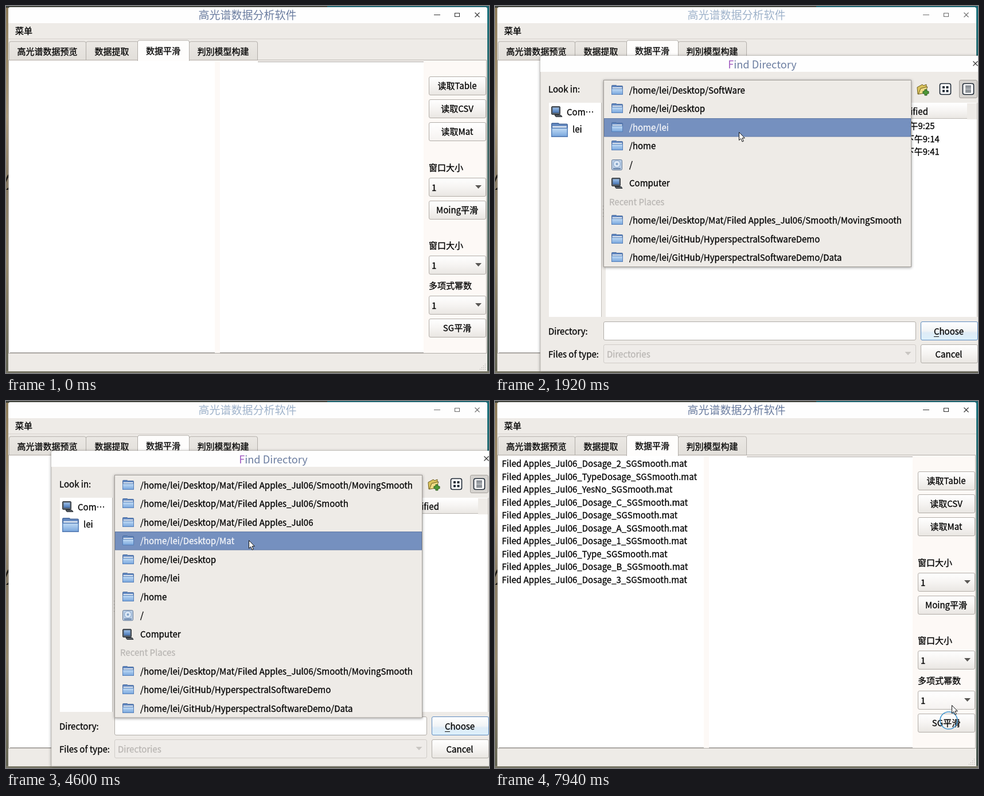
An HTML page that plays this animation: 842x641 px, repeating every 7.99 s.

```html
<!DOCTYPE html>
<html lang="zh-CN">
<head>
<meta charset="utf-8">
<title>数据平滑</title>
<style>
html, body { margin: 0; width: 100%; height: 100%; overflow: hidden; }
svg { display: block; width: 842px; height: 641px; }
text {
  font: 15px 'Noto Sans CJK SC', 'Noto Sans CJK', 'Noto Sans', sans-serif;
  color: #000; fill: currentColor; stroke: currentColor; stroke-width: .3px;
}
.title { font-size: 19px; stroke: none; color: #6b7da0; }
.title.small { font-size: 18.2px; }
.off { color: #b9b6b3; }
</style>
</head>
<body>
<svg id="stage" viewBox="0 0 842 641"></svg>
<script>
const LOOP = 7990, USER = '/home/lei', ROW = 32.5, POPUP_TOP = 131;
const PANEL = '#eeebe7', EDGE = '#b1ada8', BLUE = '#7590bf';

// --- drawing helpers; text is placed by its vertical centre
const text = (x, mid, s, attrs = '') =>
  `<text x="${x}" y="${Math.floor(mid + 6)}" ${attrs}>${s}</text>`;
const centred = (x, mid, s, attrs = '') => text(x, mid, s, 'text-anchor="middle" ' + attrs);
const rect = (x, y, w, h, fill, attrs = '') =>
  `<rect x="${x}" y="${y}" width="${w}" height="${h}" fill="${fill}" ${attrs}/>`;
const line = (d, stroke = EDGE, width = 1) =>
  `<path d="${d}" fill="none" stroke="${stroke}" stroke-width="${width}"/>`;
const group = (id, body, attrs = '') => `<g id="${id}" ${attrs}>${body}</g>`;
const at = (x, y, body) => `<g transform="translate(${x} ${y})">${body}</g>`;
const box = (x, y, w, h, fill = 'url(#face)', stroke = EDGE, attrs = '') =>
  rect(x + .5, y + .5, w - 1, h - 1, fill, `rx="2.5" stroke="${stroke}" ${attrs}`);
const arrow = (x, y, fill = '#5a5855') => `<path d="M${x - 5.5} ${y - 3}h11l-5.5 6z" fill="${fill}"/>`;
const control = y => box(737, y, 100, 33, 'url(#face)', EDGE, `class="control" data-y="${y}"`);
const button = (y, s) => control(y) + centred(786.5, y + 16, s);
const combo = y => control(y) + text(742, y + 17, '1') + arrow(823.5, y + 16);
const gradient = (id, stops) => `<linearGradient id="${id}" x2="0" y2="1">` +
  stops.map(([o, c]) => `<stop offset="${o}" stop-color="${c}"/>`).join('') + '</linearGradient>';
const grip = (x, y) => [0, 1, 2, 3].map(i => [...Array(i + 1).keys()].map(j =>
  rect(x - j * 3, y - (3 - i) * 3, 1, 1, '#a8a4a0')).join('')).join('');

// --- icons
const folder = (x, y, scale = 1) => `<g transform="translate(${x} ${y}) scale(${scale})">` +
  '<path d="M.5 16.500V1.500q0-1 1-1h7l1 1h9q1 0 1 1v14z" fill="#6288c0" stroke="#48699c"/>' +
  rect(1.5, 4, 17, 2, '#dfe7f1') + rect(.5, 6.5, 19, 10, 'url(#sky)', 'stroke="#557fb9"') + '</g>';
const computer = (x, y) => at(x, y, rect(.5, .5, 15, 14, '#555e68', 'rx="1.5" stroke="#2e343a"') +
  rect(2.5, 2.5, 11, 9, 'url(#screen)') + '<path d="M6 15.500h11l2 3H8z" fill="#5c636a" stroke="#2a2e33"/>');
const disk = (x, y) => at(x, y, rect(.5, .5, 18, 18, '#b8cce4', 'rx="2" stroke="#667a95"') +
  '<circle cx="9.5" cy="8" r="6" fill="#dce8f5" stroke="#7f9fc6"/><circle cx="9.5" cy="8" r="2" fill="#7f9fc6"/>' +
  rect(3, 15, 13, 2, '#6682a8'));
const round = (x, turn, fill, rim) => `<g transform="translate(${x} 145) rotate(${turn})">` +
  `<circle r="8" fill="${fill}" stroke="${rim}" stroke-width="1.3"/>` +
  '<path d="M-5.5 0l5-5v3h5v4h-5v3z" fill="#fff"/></g>';
const newFolder = at(735, 135, '<path d="M1 7l9-5 2 2 5-2v13l-15 4z" fill="#d9c25c" stroke="#6f5f20"/>' +
  '<path d="M3 19l4-10 12-3-4 11z" fill="#efdc86" stroke="#6f5f20"/>' +
  '<path d="M14 11h4v3h3v4h-3v3h-4v-3h-3v-4h3z" fill="#4f9a38" stroke="#2c5c1e"/>');
const viewIcon = (x, body) => at(x, 145, rect(-9.5, -9.5, 19, 19, '#fff',
  'rx="3" stroke="#1c2733" stroke-width="1.6"') + body);
const gridIcon = viewIcon(785, [-5, 1.5].map(x => [-5, 1.5].map(y => rect(x, y, 4, 4, '#1c2733')).join('')).join(''));
const listIcon = viewIcon(825, line('M-5 -5h10M-5 -1.7h10M-5 1.7h10M-5 5h10', '#1c2733', 1.5));

// --- main window
const desktop = rect(0, 0, 842, 641, 'url(#wall)') + rect(838, 0, 4, 641, 'url(#wallRight)') +
  rect(0, 0, 842, 3, '#3d4038') + rect(560, 0, 282, 3, '#1d6470') + rect(0, 637, 842, 4, '#777565');

const tab = (x, w, s) => `<path d="M${x + .5} 94V65q0-3 3-3h${w - 6}q3 0 3 3V94" fill="url(#tab)" stroke="${EDGE}"/>` +
  centred(x + w / 2, 79, s);

const samples = ['Dosage_2', 'TypeDosage', 'YesNo', 'Dosage_C', 'Dosage', 'Dosage_A', 'Dosage_1', 'Type', 'Dosage_B', 'Dosage_3'];
const mainWindow =
  `<path d="M4 638V6q0-4 4-4H835q4 0 4 4V638z" fill="${PANEL}"/>` +
  '<path d="M4 30V6q0-4 4-4H835q4 0 4 4V30z" fill="#fefefe"/>' +
  '<text id="mainTitle" class="title" x="421" y="23" text-anchor="middle">高光谱数据分析软件</text>' +
  group('controls', line('M746 15.5h11M782.5 12.5h8v6h-8zM817.5 11.500l8 8M825.500 11.500l-8 8', '#333', 1.1)) +
  text(16, 43, '菜单') + line('M4 57.5H839', '#d5d1cc') +
  rect(5, 94, 833, 512, '#fdf9f6') + line('M5 94.500H838M837.500 94V606M4 606.500H838M4.500 94V606') +
  tab(5, 134, '高光谱数据预览') + tab(139, 91, '数据提取') + tab(319, 119, '判別模型构建') +
  `<path d="M229.500 96V63q0-3 3-3h84q3 0 3 3V96" fill="#fefdfc" stroke="${EDGE}"/>` + rect(230, 94, 89, 2, '#fefdfc') +
  centred(274, 78, '数据平滑') +
  rect(6, 96, 358, 510, '#fff') + rect(373, 97, 355, 509, '#fff') +
  line('M439 97.500H728M7 605.500H364M373 605.500H728', '#a19e9a') +
  group('samples', samples.map((s, i) => text(12, 109.5 + 22.5 * i, `Filed Apples_Jul06_${s}_SGSmooth.mat`)).join('')) +
  button(123, '读取Table') + button(163, '读取CSV') + button(203, '读取Mat') +
  text(737, 282, '窗口大小') + combo(300) + button(340, 'Moing平滑') +
  text(737, 418, '窗口大小') + combo(436) + text(737, 488, '多项式幂数') + combo(506) + button(546, 'SG平滑') +
  grip(835, 634) + '<path d="M0 321l4-4v4zM0 308q0-10 4-14v5q-2 4-4 9z" fill="#15130f"/>';

// --- directory dialog, laid out at its resting place
const fileRow = ([name, date], i) => {
  const mid = 209.5 + 22.5 * i;
  return folder(197, Math.floor(mid - 8)) + text(224, mid, name) + text(564, mid, 'Folder') + text(659, mid, date);
};
const listings = [
  [['__pycache__', '18/4/6 下午9:25'], ['Data', '18/3/23 下午9:14'], ['img', '18/3/28 下午9:41']],
  [],
  [['MovingSmooth', '18/4/1 下午8:02'], ['SGSmooth', '18/4/1 下午8:02']]
];
const paths = [`${USER}/Desktop/SoftWare`, `${USER}/Desktop/M…6/Smooth/MovingSmooth`, `${USER}/Desktop/Mat…d Apples_Jul06/Smooth`];
const header = [[218, 'Name'], [468, 'Size'], [563, 'Type'], [658, 'Date Modified']];

const dialogBody =
  `<path d="M79 638V91q0-4 4-4H851q4 0 4 4V638z" fill="${PANEL}" stroke="#a5a19c" stroke-width=".7" filter="url(#shade)"/>` +
  '<path d="M79 115V91q0-4 4-4H851q4 0 4 4V115z" fill="#fefefe"/>' +
  '<text class="title small" x="466" y="109" text-anchor="middle"><tspan id="capF">F</tspan>ind <tspan id="capD">D</tspan>irectory</text>' +
  line('M833.500 96.500l8 8M841.500 96.500l-8 8', '#333', 1.1) +
  text(93, 145, 'Look in:') + box(189, 129, 412, 32) + folder(197, 137) + arrow(587.5, 145) +
  round(625, 0, '#3f8a34', '#24501f') + round(665, 180, '#b4b2af', '#979592') + round(705, 90, '#3f8a34', '#24501f') +
  newFolder + gridIcon + box(809, 129, 32, 32, '#d6d3cf', '#a5a19c') + listIcon +
  rect(94, 169, 92, 374, '#fff') + line('M185.500 169V543', '#c4c0bb') +
  computer(98, 175) + text(125, 185, 'Com⋯') + folder(98, 204, 1.45) + text(135, 215, 'lei') +
  [...Array(7).keys()].map(i => rect(188 + i % 2, 349 + 3 * i, 1, 1, '#aaa6a1')).join('') +
  rect(193, 169, 648, 374, '#fff') + rect(193, 170, 630, 27, 'url(#face)') + rect(823, 170, 18, 28, PANEL) +
  line('M193 196.500H823M840.500 169V543', '#bdb9b4') + line('M464.500 170V196M558.500 170V196M653.500 170V196', '#cfcbc6') +
  header.map(([x, s]) => text(x, 184, s)).join('') + arrow(453, 184) +
  rect(193, 221, 630, 22, BLUE, 'id="picked"') +
  listings.map((rows, i) => group('dir' + i, text(220, 145, paths[i]) + rows.map(fileRow).join(''))).join('') +
  text(93, 568, 'Directory:') + box(189, 551, 545, 33, '#fff', EDGE, 'id="field"') + text(195, 568, 'SGSmooth', 'id="fieldText"') +
  box(742, 551, 100, 33, 'url(#blueFace)', '#5f8cc0') + centred(791, 568, 'Choose') + line('M765 577.500h9', '#111') +
  text(93, 608, 'Files of type:') + box(189, 591, 545, 33, '#efece9', '#d0ccc8') + text(195, 608, 'Directories', 'class="off"') +
  arrow(720, 607, '#c9c6c2') + box(742, 591, 100, 33) + centred(791, 608, 'Cancel') + grip(851, 634);

// --- drop-down lists
const RECENT = 'Recent Places';
const mat = `${USER}/Desktop/Mat`, apples = `${mat}/Filed Apples_Jul06`, moving = `${apples}/Smooth/MovingSmooth`;
const hub = `${USER}/GitHub/HyperspectralSoftwareDemo`;
const shared = [`${USER}/Desktop`, USER, '/home', '/', 'Computer', RECENT, moving, hub, `${hub}/Data`];
const menus = [
  { rows: [`${USER}/Desktop/SoftWare`, ...shared], from: 1790, to: 3410 },
  { rows: [moving, `${apples}/Smooth`, apples, mat, ...shared], from: 4190, to: 6130 }
];
const menuRow = (s, i) => {
  const mid = POPUP_TOP + 16.2 + ROW * i, top = Math.floor(mid - 9);
  if (s === RECENT) return text(199, mid, s, 'class="off"');
  const icon = s === '/' ? disk(203, top) : s === 'Computer' ? computer(203, top) : folder(203, top);
  return icon + text(234, mid, s);
};
const menuBody = (menu, i) => group('menu' + i,
  rect(189.5, 129.5, 536, ROW * menu.rows.length + 1, PANEL, 'stroke="#a19d98" filter="url(#shade)"') +
  rect(190.5, 0, 534, ROW - 1, BLUE, 'class="bar" stroke="#6079a6"') + menu.rows.map(menuRow).join(''));

const $ = id => document.getElementById(id);
$('stage').innerHTML = '<defs>' +
  gradient('face', [[0, '#fff'], [.5, '#f6f4f2'], [1, '#e9e6e2']]) +
  gradient('hover', [[0, '#fff'], [.5, '#fbf9f8'], [1, '#f5f2f0']]) +
  gradient('blueFace', [[0, '#fff'], [.5, '#f1f4f6'], [.6, '#dfecf7'], [1, '#dcf0fb']]) +
  gradient('tab', [[0, '#ebe8e4'], [1, '#e2dfda']]) + gradient('sky', [[0, '#c2dcf5'], [1, '#78a6dd']]) +
  gradient('screen', [[0, '#9cc0ea'], [1, '#4674b4']]) +
  gradient('wall', [[0, '#8d7c5a'], [.3, '#ac9c7e'], [.48, '#8a7e67'], [.7, '#968a6e'], [1, '#656656']]) +
  gradient('wallRight', [[0, '#17707c'], [.3, '#3a6a6a'], [.7, '#5b6a63'], [1, '#425049']]) +
  '<filter id="shade" x="-5%" y="-5%" width="110%" height="110%"><feDropShadow dx="0" dy="1" stdDeviation="2.500" flood-opacity=".4"/></filter></defs>' +
  desktop + mainWindow + group('dialog', dialogBody) + menus.map(menuBody).join('') +
  '<circle id="ring" fill="none" stroke="#3d93cf" stroke-width="1.5"/>' +
  '<path id="cursor" d="M.5 .5V14.500L3.700 11.500L6 17L8.300 16L6 10.700H10.300z"/>';

// --- motion
const track = [ // ms, x, y
  [190, 790, 224], [430, 790, 224], [930, 71, 36], [1050, 71, 36], [1420, 292, 98], [1630, 420, 147],
  [1800, 420, 147], [1920, 425, 220], [2630, 467, 361], [2760, 467, 361], [3080, 464, 376], [3420, 464, 376],
  [3970, 415, 146], [4440, 415, 146], [4600, 423, 243], [5230, 450, 505], [5280, 450, 505], [5990, 400, 181],
  [6150, 400, 181], [6570, 365, 237], [6800, 364, 225], [6940, 364, 225], [7700, 791, 558], [7790, 791, 558],
  [7940, 796, 531], [7990, 797, 526]
];
const clicks = [300, 1650, 3410, 6130, 6850, 7750], RING_MS = 250;

function pointer(t) {
  const i = track.findIndex(k => k[0] >= t);
  if (i < 1) return track[0].slice(1);
  const [t0, x0, y0] = track[i - 1], [t1, x1, y1] = track[i];
  const p = (t - t0) / (t1 - t0), e = p * p * (3 - 2 * p);
  return [x0 + (x1 - x0) * e, y0 + (y1 - y0) * e];
}
const show = (id, on) => $(id).style.display = on ? '' : 'none';
const move = (id, x, y) => $(id).setAttribute('transform', `translate(${Math.round(x)} ${Math.round(y)})`);

function drawMenu(menu, i, t, y) {
  const open = t >= menu.from && t < menu.to;
  show('menu' + i, open);
  if (!open) return;
  let row = Math.max(0, Math.min(menu.rows.length - 1, Math.floor((y - POPUP_TOP) / ROW)));
  if (menu.rows[row] === RECENT) row--;
  const el = $('menu' + i);
  el.querySelector('.bar').setAttribute('y', Math.floor(POPUP_TOP + ROW * row) + .5);
  el.querySelectorAll('text').forEach((label, n) => label.style.color = n === row ? '#f6f7fa' : '');
}

function draw(t) {
  const [x, y] = pointer(t), dialogOpen = t >= 400 && t < 7780, dragged = t >= 1420;
  show('dialog', dialogOpen);
  const [dx, dy] = dragged ? [292, 98] : pointer(Math.max(t, 1050));
  move('dialog', dx - 292, dy - 98);
  $('capF').style.color = dragged ? '#a05cc0' : '';
  $('capD').style.color = dragged ? '' : '#9272b8';
  $('mainTitle').style.color = dialogOpen ? '#9fb3cb' : '';
  $('controls').style.opacity = dialogOpen ? .7 : 1;
  $('field').setAttribute('stroke', t < 1790 ? '#4f82bd' : EDGE);
  document.querySelectorAll('.control').forEach(el => {
    const over = !dialogOpen && x > 737 && y > el.dataset.y && y < +el.dataset.y + 33;
    el.setAttribute('fill', over ? 'url(#hover)' : 'url(#face)');
  });

  const dir = t < 3410 ? 0 : t < 6130 ? 1 : 2, picked = t >= 6870;
  listings.forEach((_, i) => show('dir' + i, i === dir));
  show('picked', picked);
  show('fieldText', picked);
  show('samples', t >= 7780);
  menus.forEach((menu, i) => drawMenu(menu, i, t, y));

  const click = clicks.find(c => t >= c && t < c + RING_MS);
  show('ring', click !== undefined);
  if (click !== undefined) {
    move('ring', ...pointer(click));
    $('ring').setAttribute('r', 4 + 14.5 * (t - click) / RING_MS);
  }
  const dark = t > 900 && t < 1450;
  show('cursor', t >= 190);
  move('cursor', x, y);
  $('cursor').setAttribute('fill', dark ? '#111' : '#fff');
  $('cursor').setAttribute('stroke', dark ? '#555' : '#111');
}

const start = performance.now();
function tick() {
  draw((performance.now() - start) % LOOP);
  requestAnimationFrame(tick);
}
tick();
</script>
</body>
</html>
```
